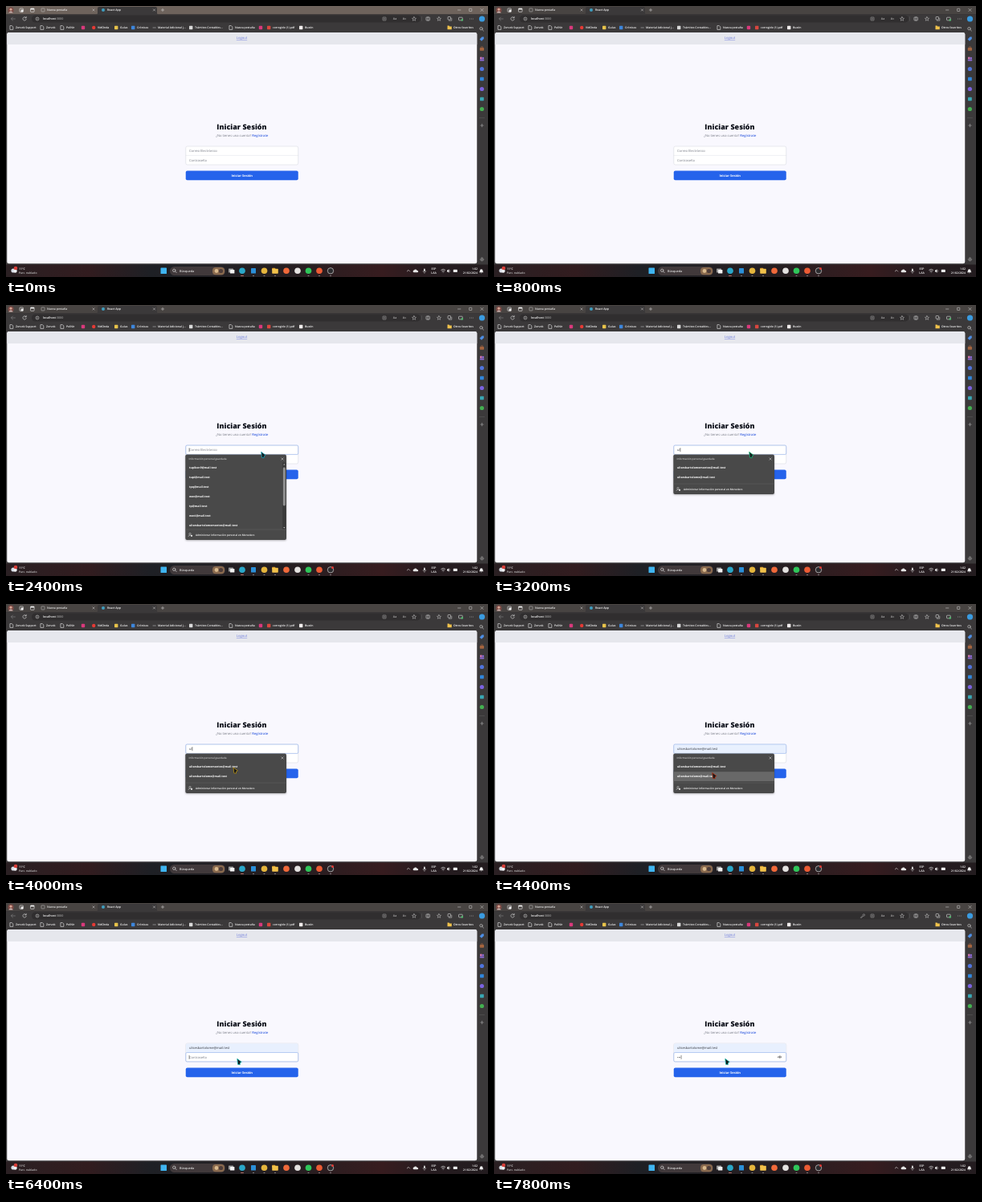
Recreate the animation shown at these times as an HTML page. Size 600x338 px, loop 8000 ms.

```html
<!DOCTYPE html>
<html lang="es">
<head>
<meta charset="utf-8">
<style>
html, body { margin: 0; width: 100%; height: 100%; overflow: hidden; background: #2a2626; }
svg { display: block; width: 600px; height: 338px; }
text { font-family: "Open Sans", "Noto Sans", sans-serif; text-rendering: geometricPrecision; white-space: pre; }
</style>
</head>
<body>
<svg id="stage" viewBox="0 0 600 338" font-weight="600">
  <defs>
    <linearGradient id="bar">
      <stop offset="0" stop-color="#2a2023"/><stop offset=".17" stop-color="#321c1f"/>
      <stop offset=".3" stop-color="#1e2025"/><stop offset=".6" stop-color="#261e21"/>
      <stop offset=".78" stop-color="#371c1f"/><stop offset=".88" stop-color="#261c20"/>
      <stop offset="1" stop-color="#231c1f"/>
    </linearGradient>
    <filter id="shadow" x="-10%" y="-10%" width="120%" height="125%">
      <feDropShadow dx="0" dy="1" stdDeviation="1.2" flood-opacity=".28"/>
    </filter>
    <clipPath id="items"><rect x="223" y="197" width="122" height="81"/></clipPath>
  </defs>
</svg>
<script>
const stage = document.getElementById('stage');
let parent = stage;

function el(tag, attrs, content) {
  const node = document.createElementNS('http://www.w3.org/2000/svg', tag);
  for (const k in attrs) node.setAttribute(k, attrs[k]);
  if (content) node.textContent = content;
  return parent.appendChild(node);
}
const rect = (x, y, width, height, fill, rx = 0, more) => el('rect', { x, y, width, height, fill, rx, ...more });
const dot = (cx, cy, r, fill, more) => el('circle', { cx, cy, r, fill, ...more });
const line = (d, stroke = '#ddd', width = .6, fill = 'none') =>
  el('path', { d, stroke, fill, 'stroke-width': width, 'stroke-linecap': 'round', 'stroke-linejoin': 'round' });
// y is the middle of the letters
const text = (x, y, s, size, fill = '#fff', more) =>
  el('text', { x, y: y + size * .35, 'font-size': size, fill, ...more }, s);
const mid = { 'text-anchor': 'middle' };
function group(build, attrs) {
  const outer = parent, g = el('g', attrs);
  parent = g;
  build();
  parent = outer;
  return g;
}
const show = (node, on) => node.setAttribute('visibility', on ? 'inherit' : 'hidden');

const cross = (x, y, r, c) => line(`M${x - r} ${y - r}l${2 * r} ${2 * r}m0 ${-2 * r}l${-2 * r} ${2 * r}`, c, .5);
const plus = (x, y, r, c) => line(`M${x - r} ${y}h${2 * r}M${x} ${y - r}v${2 * r}`, c, .5);
const lens = (x, y, c) => line(`M${x + .9} ${y + .9}l1.5 1.5M${x + 1.2} ${y - .4}a1.7 1.7 0 1 0 -3.4 0a1.7 1.7 0 1 0 3.4 0`, c);
const page = (x, y) => line(`M${x - 1.7} ${y - 2.4}h2.1l1.4 1.4v3.4h-3.5z`, '#eee', .6);
const star = x => line(`M${x} 13.6l.8 1.6l1.7.2l-1.3 1.2l.4 1.7l-1.6-.9l-1.6.9l.4-1.7l-1.3-1.2l1.7-.2z`, '#ccc', .5);

let strip;
function titleBar() {
  strip = rect(0, 0, 600, 10.5, '#484442');
  rect(2.5, 1.5, 7, 7.5, '#7b4a45', 3.5);
  dot(6, 4.2, 1.5, '#d8a796');
  el('path', { d: 'M3.2 8.6q2.8-4.4 5.6 0z', fill: '#c8b9b6' });
  rect(17, 3, 4.4, 4.4, 'none', .8, { stroke: '#eee', 'stroke-width': .6 });
  rect(18.6, 4.6, 2.8, 2.8, '#eee', .5);
  rect(30.5, 3, 4.6, 4.4, 'none', .7, { stroke: '#eee', 'stroke-width': .6 });
  rect(30.5, 3, 4.6, 1.5, '#eee', .5);
  rect(44, 3, 4, 4, 'none', .6, { stroke: '#ccc', 'stroke-width': .5 });
  text(51, 5, 'Nueva pestaña', 3.5, '#eee');
  cross(109, 5, 1.1, '#ccc');
  el('path', { d: 'M112 11q2 0 2-2V3q0-2 2-2H186q2 0 2 2V9q0 2 2 2z', fill: '#3b393a' });
  dot(121, 5, 2, '#3f9fc0');
  text(126, 5, 'React App', 3.5);
  cross(184.5, 5, 1.1, '#ddd');
  plus(195, 5, 1.7, '#ddd');
  line('M562.5 5h3.4', '#ddd', .5);
  rect(576.6, 3.3, 3.2, 3.2, 'none', .3, { stroke: '#ddd', 'stroke-width': .5 });
  cross(592.5, 5, 1.6, '#ddd');
}

function toolBar() {
  rect(0, 10.5, 600, 313, '#3b393a');
  rect(32, 11.5, 484, 9, '#302e2f', 4.5);
  line('M11.4 16h-5m2-2l-2 2l2 2', '#888');
  line('M25 14.7a2.2 2.2 0 1 0 .3 1.8M25.2 13.3v1.6h-1.6', '#ddd');
  dot(39, 16, 2, 'none', { stroke: '#ddd', 'stroke-width': .5 });
  line('M39 15.8v1.1M39 14.9v.05', '#ddd', .5);
  text(46, 16, 'localhost', 3.65).append(el('tspan', { fill: '#a0a0a0' }, ':3000'));
  const icon = '#bbb';
  rect(469, 14, 4, 4, 'none', .5, { stroke: icon, 'stroke-width': .5 });
  line('M470.2 15.4h1.6m-1.6 1.3h1.6', icon, .4);
  text(484, 16, 'Aa', 3.6, icon, mid);
  text(496, 16, 'A»', 3.6, icon, mid);
  star(508);
  line('M517.5 13.5v5', '#666', .4);
  rect(523, 14, 4.4, 4, 'none', .6, { stroke: '#ddd', 'stroke-width': .6 });
  line('M525.2 14v4', '#ddd');
  star(539);
  rect(550, 13.5, 3.5, 3.5, 'none', .6, { stroke: '#ddd', 'stroke-width': .6 });
  line('M551.3 18.2h3.5v-3', '#ddd', .5);
  rect(563.5, 14.2, 4.8, 3.7, 'none', .8, { stroke: '#ddd', 'stroke-width': .6 });
  dot(567.8, 17.4, 1.3, '#4fb46b');
  for (const x of [577.6, 579.4, 581.2]) dot(x, 16, .4, '#ddd');
  dot(592.5, 16, 3.6, '#3a9be0');
}

function favorites() {
  const marks = [
    [12, 'Zorvek Support'], [50, 'Zorvek'], [75, 'PolNir'],
    [114, 'VidOnda', '#e53a35'], [142, 'Guías', '#e8c34a'], [163, 'Crónicas', '#3d86dc'],
    [189, 'Material Adicional j...', 'dash'], [235, 'Trámites Contables...', '#d9d9d9'],
    [285, 'Nueva pestaña'], [332, 'corregido (1).pdf', '#d9463e'], [372, 'Buzón', '#f2eded']
  ];
  for (const [x, name, color] of marks) {
    if (!color) page(x - 5, 27);
    else if (color == 'dash') line(`M${x - 6} 27h3.4`, '#aaa', .7);
    else rect(x - 7, 24.8, 4.4, 4.4, color, name == 'VidOnda' ? 2.2 : .6);
    text(x, 27, name, 3.45);
  }
  for (const x of [96, 317]) rect(x - 2.2, 24.8, 4.4, 4.4, '#d9397c', 1);
  el('path', { d: 'M549.5 24.6h2l.7.9h2.6v3.7h-5.3z', fill: '#f0c24b' });
  text(557, 27, 'Otros favoritos', 3.45);
}

function sideBar() {
  lens(592, 28.6, '#ddd');
  const colors = ['#4d8fe6', '#a5643e', '#8c6bd8', '#4f74dd', '#2f86dd', '#7a62e0', '#38a7b4', '#43b050'];
  colors.forEach((c, i) => {
    const y = 41 + i * 12.5;
    if (i == 0) el('path', { d: `M589.6 ${y + .4}l2.8-2.8h2.4v2.4l-2.8 2.8z`, fill: c });
    else if (i == 1) { rect(589.8, y - 1.5, 5.2, 3.8, c, .7); line(`M591.3 ${y - 1.7}v-1h2.2v1`, c); }
    else if (i == 2) { dot(591.3, y - 1, 1.4, '#d878b4'); dot(593.8, y - 1, 1.3, c); rect(589.7, y + .6, 5.6, 2, c, 1); }
    else i % 2 ? dot(592.4, y, 2.6, c) : rect(590, y - 2.3, 4.8, 4.6, c, .8);
  });
  line('M589.5 139.5h6', '#666', .4);
  plus(592.5, 149, 1.8, '#bbb');
  dot(592.5, 316, 1.9, 'none', { stroke: '#ccc', 'stroke-width': .8, 'stroke-dasharray': '1 .5' });
  dot(592.5, 316, .7, '#ccc');
}

function webPage() {
  rect(1.25, 33, 585, 288.25, '#f9f8fe', 2.5);
  el('path', { d: 'M1.25 48V35.5q0-2.5 2.5-2.5H583.75q2.5 0 2.5 2.5V48z', fill: '#e6e7ed' });
  text(293.5, 40, 'Logout', 4.1, '#6675dc', { ...mid, 'text-decoration': 'underline' });
  text(293.5, 150.8, 'Iniciar Sesión', 9, '#0c0f18', { ...mid, 'font-weight': 800 });
  text(293.8, 161.4, '¿No tienes una cuenta? ', 4.1, '#747883', mid)
    .append(el('tspan', { fill: '#3a63e0', 'font-weight': 600 }, 'Regístrate'));
  rect(223.75, 175, 140, 23, '#fff', 2, { stroke: '#d3d5dd', 'stroke-width': .5 });
  line('M223.75 186.4h140', '#d9dbe2', .4);
  rect(223.75, 205.5, 140, 11.8, '#2563eb', 2);
  text(293.7, 211.5, 'Iniciar Sesión', 4, '#fff', { ...mid, 'font-weight': 700 });
}

function taskBar() {
  rect(0, 322.5, 600, 15.5, 'url(#bar)');
  dot(9, 330, 2.6, '#d5dbe4'); dot(11.5, 330.5, 2.2, '#eef1f5'); dot(12, 327, 2.3, '#d8403b');
  text(16, 327.8, '11°C', 3.5);
  text(16, 333, 'Parc. nublado', 3.4, '#ccc');
  rect(192.5, 326.5, 7.5, 7.5, '#3fb4f0', .6);
  rect(204, 325, 69, 11, '#41393b', 5.5);
  lens(209.8, 330.2, '#eee');
  text(216, 330.5, 'Búsqueda', 3.8, '#ddd');
  rect(257, 326, 15, 9.2, '#8a6a4e', 4);
  dot(262, 330.5, 2.4, '#d9b98d'); dot(267.5, 330.5, 2.6, '#4e3d3a');
  rect(277, 327.5, 6, 5, '#9a9a9a', .6); rect(279, 329, 5.4, 4.5, '#f2f2f2', .6);
  const apps = [[294, '#2aa7c8'], [308, '#2b8fd8'], [321.5, '#e5b53c'], [335, '#f2c14a'], [349, '#f0693a'],
    [363, '#e4e2e0'], [376.5, '#2fc65a'], [390, '#ec5b34']];
  for (const [x, c] of apps) {
    if (x == 335) { rect(x - 3.8, 326.7, 4, 3, '#d99b2b', .5); rect(x - 3.8, 327.7, 7.6, 6, c, .7); }
    else if (x == 308) rect(x - 3, 327, 6, 6.6, c, .6);
    else dot(x, 330.3, 3.8, c);
  }
  dot(404, 330.3, 3.7, '#2b2b2e', { stroke: '#d5d5d5', 'stroke-width': .7 });
  for (const x of [294, 308, 321.5, 335, 376.5, 390, 404])
    rect(x - (x == 294 ? 2 : 1), 336, x == 294 ? 4 : 2, .8, x == 294 ? '#e58a7d' : '#aaa', .4);
  line('M499.3 331l1.7-1.7l1.7 1.7', '#eee');
  el('path', { d: 'M507.5 332.3a1.4 1.4 0 0 1 .5-2.7a2.1 2.1 0 0 1 3.8.3a1.2 1.2 0 0 1 .3 2.4z', fill: '#e5e5e5' });
  rect(520, 327.5, 1.8, 3.6, '#ddd', .9);
  line('M519 330.5a1.9 1.9 0 0 0 3.8 0M520.9 332.4v1', '#ddd', .4);
  text(532.5, 327.8, 'ESP', 3.5, '#fff', mid);
  text(532.5, 333, 'LAA', 3.5, '#fff', mid);
  line('M541.8 329.2q2.4-2 4.8 0M542.9 330.8q1.3-1 2.6 0M544.2 332.2v.05', '#eee', .7);
  el('path', { d: 'M549 329.6h1l1.4-1.3v4.4l-1.4-1.3h-1z', fill: '#eee' });
  line('M552.3 329.3q.9 1.2 0 2.4', '#eee', .4);
  rect(556.8, 328.8, 5, 3.2, '#eee', .6);
  text(587, 327.8, '1:02', 3.5, '#fff', { 'text-anchor': 'end' });
  text(587, 333, '21/02/2024', 3.4, '#fff', { 'text-anchor': 'end' });
  el('path', { d: 'M589 332.2q.9-.8.9-2.2a1.8 1.8 0 0 1 3.6 0q0 1.4.9 2.2zM590.9 332.7h1.6l-.8.8z', fill: '#eee' });
}

const user = 'ulisesbartolome', mail = user + '@mail.test', longMail = user + 'montes@mail.test';
let hover;

function popup(names, bottom, scrolls) {
  const foot = bottom - 6.4;
  return group(() => {
    rect(223.3, 186.5, 125.7, bottom - 186.5, '#4a4a4a', 2, { filter: 'url(#shadow)' });
    text(227.5, 192, 'Información personal guardada', 3.1, '#c8c8c8');
    cross(344, 192, 1.2, '#ddd');
    if (!scrolls) hover = rect(223.5, 209.2, 125.3, 11.8, '#686868');
    group(() => names.forEach((s, i) => text(228, 203.2 + i * 11.85, s, 3.5, '#fff', { 'font-weight': 700 })),
      scrolls && { 'clip-path': 'url(#items)' });
    line(`M223.5 ${foot - 6.6}h125.3`, '#666', .4);
    dot(229, foot - 1, 1.2, 'none', { stroke: '#ddd', 'stroke-width': .5 });
    line(`M227 ${foot + 2}q.4-1.8 2.2-1.6`, '#ddd', .5);
    dot(231, foot + 1.2, 1.1, '#eee');
    text(236, foot, 'Administrar información personal en Monedero', 3.2);
    if (scrolls) {
      rect(344.3, 196.5, 4, 83, '#3a3a3a');
      rect(344.8, 202.5, 3, 48, '#909090', 1.4);
      el('path', { d: 'M345.2 199.4h2.2l-1.1-1.5zM345.2 277h2.2l-1.1 1.5z', fill: '#bbb' });
    }
  });
}

titleBar(); toolBar(); favorites(); sideBar(); taskBar();
group(webPage, { 'font-weight': 400 });
const recording = dot(406.5, 327.5, 1.5, '#e33b35');
const keyIcon = line('M456.6 18l2.6-2.6a1.2 1.2 0 1 1 .7.7l-2.6 2.4z', '#bbb', .5);
const filled = rect(224, 175.2, 139.5, 11, '#e8f0fe', 1.5);
const ring = rect(223.75, 175, 140, 11.4, 'none', 1.5, { stroke: '#7ea4ec', 'stroke-width': .5 });
const email = text(228, 180.6, ' ', 4.05, '#333', { 'font-weight': 400 });
const pass = text(228, 192.2, ' ', 4.05, '#333', { 'font-weight': 400 });
const eye = group(() => {
  line('M353.5 192.2q2.2-3 4.6 0q-2.4 2.6-4.6 0z', '#444', .5);
  dot(355.8, 192.1, .8, '#444');
});
const caret = rect(0, 0, .5, 5, '#222');
const fullList = popup(['tupikon9@mail.test', 'tupi@mail.test', 'tpq@mail.test', 'wov@mail.test', 'tp@mail.test',
  'wovi@mail.test', longMail], 293, true);
const shortList = popup([longMail, mail], 236);
const pointer = el('path', { d: 'M0 0L5.4 4L3.6 5L3.4 7.4L.8 7z', fill: '#15171a', 'stroke-width': .8, 'stroke-linejoin': 'round' });

// time, x, y, hue of the pointer edge
const path = [[1000, 602, 118, 40], [1200, 570, 138, 36], [1600, 505.5, 166.5, 26], [2000, 317.7, 183.3, 200],
  [2400, 317.7, 183.3, 188], [3200, 317.7, 183.3, 155], [3400, 317, 184, 130], [4200, 271.7, 210.5, 18],
  [4600, 271.7, 210.5, 5], [5000, 287.8, 194.3, 182], [8000, 287.8, 194.3, 175]];

function pointerAt(t) {
  const i = Math.max(1, path.findIndex(p => p[0] >= t)), a = path[i - 1], b = path[i];
  const k = (t - a[0]) / (b[0] - a[0]);
  return a.map((v, j) => v + (b[j] - v) * k);
}

function setField(node, value, hint) {
  node.textContent = value || hint;
  node.setAttribute('fill', value ? '#30333a' : '#747883');
}

const emailKeys = [2800, 3000], passKeys = [7000, 7200, 7400];
const count = (t, times) => times.filter(v => t >= v).length;

function draw(t) {
  const typed = count(t, emailKeys), chars = count(t, passKeys);
  const onEmail = t >= 2200 && t < 5000, onPass = t >= 5000, preview = t >= 4200;

  // the title strip dims as the window gains focus
  const dim = Math.min(1, t / 400);
  strip.setAttribute('fill', `rgb(${110 - 38 * dim} ${99 - 31 * dim} ${92 - 26 * dim})`);
  show(recording, t >= 200);
  show(keyIcon, chars);
  show(eye, chars);
  show(filled, preview);
  show(ring, onEmail || onPass);
  ring.setAttribute('y', onPass ? 186.5 : 175);
  setField(email, preview ? mail : user.slice(0, typed), 'Correo Electrónico');
  setField(pass, '•'.repeat(chars), 'Contraseña');
  show(fullList, t >= 2200 && !typed);
  show(shortList, typed && t < 4600);
  show(hover, preview);

  const lastInput = [2200, ...emailKeys, 5000, ...passKeys].findLast(v => t >= v);
  const field = onPass ? pass : email, empty = onPass ? !chars : !typed;
  caret.setAttribute('x', empty ? 227.8 : 228.2 + field.getComputedTextLength());
  caret.setAttribute('y', onPass ? 189.8 : 178.2);
  show(caret, (onEmail && !preview || onPass) && (t - lastInput) % 1000 < 500);

  show(pointer, t >= 1000);
  if (t >= 1000) {
    const [, x, y, hue] = pointerAt(t);
    pointer.setAttribute('transform', `translate(${x} ${y})`);
    pointer.setAttribute('stroke', `hsl(${hue} 80% 40%)`);
  }
}

function tick() {
  // the screen refreshes five times a second
  draw(Math.floor(performance.now() % 8000 / 200) * 200);
  requestAnimationFrame(tick);
}
tick();
</script>
</body>
</html>
```
